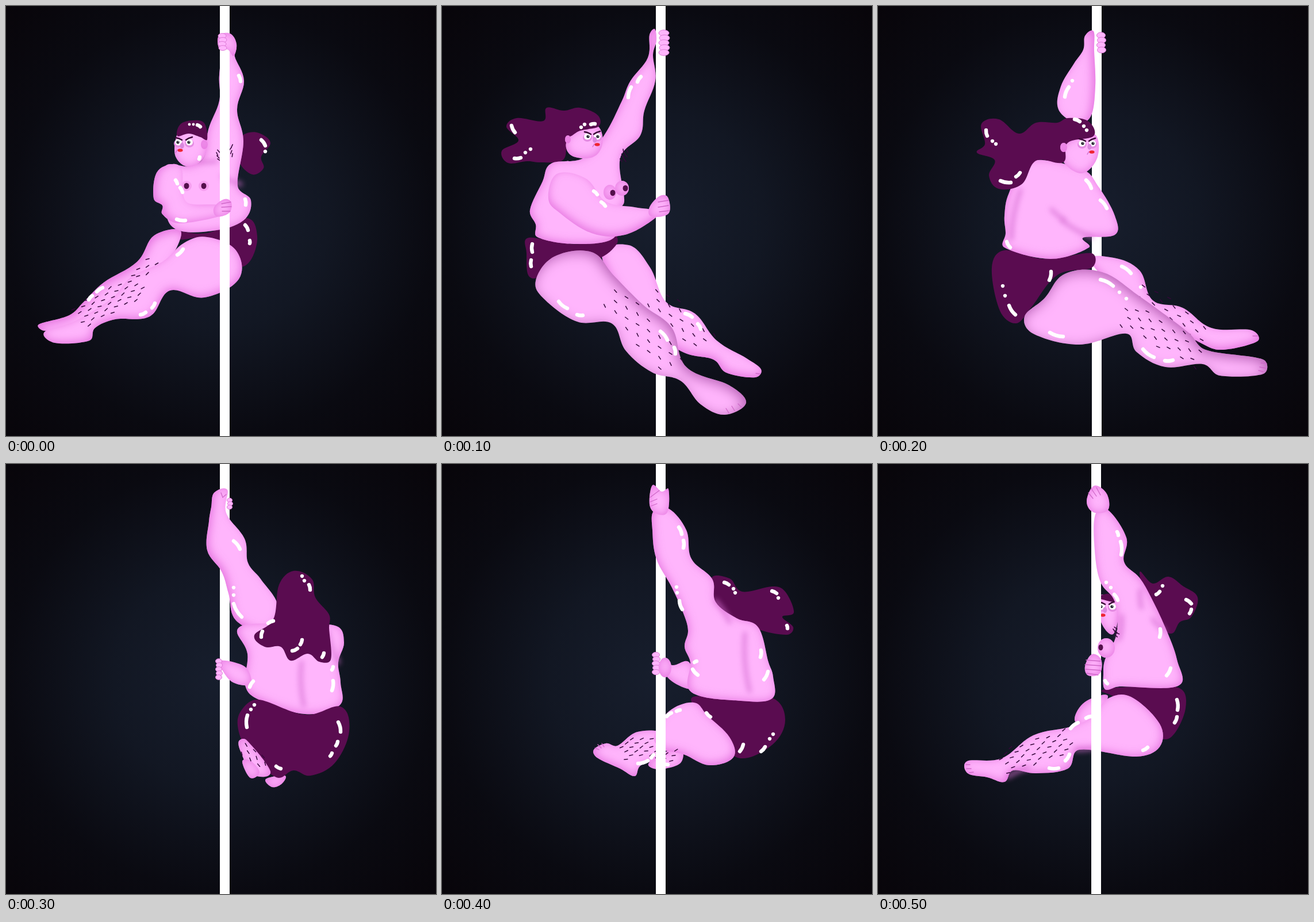
Animation, 748 px wide and 748 px high, one loop 600 ms. Source, as an HTML page:

```html
<!DOCTYPE html>
<html lang="en">
<head>
<meta charset="utf-8">
<title>Pole spin</title>
<style>
html, body { margin: 0; height: 100%; overflow: hidden; background: #08060b; }
svg { display: block; width: 100vw; height: 100vh; }
.pose { visibility: hidden; animation: turn .6s step-end infinite; animation-delay: calc(var(--i) * .1s - .6s); }
@keyframes turn { 0% { visibility: visible; } 16.666%, 100% { visibility: hidden; } }
.skin { fill: #ffb5fc; }
.dark { fill: #5a0c50; }
.pole { fill: #fff; }
.shine, .hair, .fold, .crease, .brow { fill: none; stroke-linecap: round; }
.shine { stroke: #fff; stroke-width: 6.4; }
.hair { stroke: #35083a; stroke-width: 1.5; }
.fold { stroke: #d670d2; stroke-width: 7; filter: url(#soft); opacity: .7; }
.crease { stroke: #cf68c8; stroke-width: 1.3; }
.brow { stroke: #3a0836; stroke-width: 2.6; }
</style>
</head>
<body>
<svg id="stage" viewBox="0 0 748 748">
  <defs>
    <radialGradient id="night" gradientUnits="userSpaceOnUse" cx="374" cy="374" r="530">
      <stop offset="0" stop-color="#171e2d"/>
      <stop offset=".35" stop-color="#121723"/>
      <stop offset=".7" stop-color="#0a0a11"/>
      <stop offset="1" stop-color="#08050a"/>
    </radialGradient>
    <filter id="soft" filterUnits="userSpaceOnUse" x="0" y="0" width="748" height="748"><feGaussianBlur stdDeviation="5"/></filter>
  </defs>
  <rect width="748" height="748" fill="url(#night)"/>
</svg>
<script>
const stage = document.getElementById('stage');
const defs = stage.querySelector('defs');
let pose, count = 0;

function add(tag, attrs, parent = pose) {
  const node = document.createElementNS('http://www.w3.org/2000/svg', tag);
  for (const k in attrs) node.setAttribute(k, attrs[k]);
  return parent.appendChild(node);
}

// Smooth closed outline through the points of "x y x y ..."
function outline(text) {
  const v = text.split(' ').map(Number), n = v.length / 2;
  const at = i => [v[(i + n) % n * 2], v[(i + n) % n * 2 + 1]];
  let d = 'M' + at(0);
  for (let i = 0; i < n; i++) {
    const [a, b, c, e] = [at(i - 1), at(i), at(i + 1), at(i + 2)];
    // limit handles on short spans, so tight corners do not loop
    const span = Math.hypot(c[0] - b[0], c[1] - b[1]);
    const pull = (u, w) => Math.min(1 / 5.4, .42 * span / Math.hypot(w[0] - u[0], w[1] - u[1]));
    const p = [0, 1].map(k => b[k] + (c[k] - a[k]) * pull(a, c));
    const q = [0, 1].map(k => c[k] - (e[k] - b[k]) * pull(b, e));
    d += `C${p} ${q} ${c}`;
  }
  return d + 'Z';
}

// Inner shadow falling in from the side opposite to (dx, dy)
function shade(dx, dy, deep) {
  const id = `in${dx}_${dy}_${deep ? 1 : 0}`.replace(/-/g, 'm');
  if (!document.getElementById(id)) {
    const f = add('filter', { id, 'color-interpolation-filters': 'sRGB' }, defs);
    add('feOffset', { in: 'SourceAlpha', dx, dy }, f);
    add('feGaussianBlur', { stdDeviation: deep ? 11 : 8, result: 'b' }, f);
    add('feComposite', { in: 'SourceAlpha', in2: 'b', operator: 'out', result: 'i' }, f);
    add('feFlood', { 'flood-color': deep ? '#a850a6' : '#df68d8', 'flood-opacity': .85 }, f);
    add('feComposite', { in2: 'i', operator: 'in', result: 's' }, f);
    const m = add('feMerge', {}, f);
    add('feMergeNode', { in: 'SourceGraphic' }, m);
    add('feMergeNode', { in: 's' }, m);
  }
  return `url(#${id})`;
}

const skin = (p, dx = 0, dy = 0, deep) =>
  add('path', { class: 'skin', d: outline(p), filter: shade(dx, dy, deep) });
const dark = p => add('path', { class: 'dark', d: outline(p) });
const dot = (cx, cy, rx, fill, ry = rx) => add('ellipse', { cx, cy, rx, ry, fill });
const ball = (x, y, rx, ry) => dot(x, y, rx, '#ffb5fc', ry).setAttribute('filter', shade(0, -2));
const pole = (x = 372) => add('rect', { class: 'pole', x, y: 0, width: 17, height: 748 });

// Strokes "x y x y|...", slightly bent; a lone point is a dot
const lines = (kind, bend = 0) => p => p.split('|').forEach(s => {
  const [x, y, u = x + .01, v = y] = s.split(' ').map(Number);
  const mx = (x + u) / 2 + (v - y) * bend, my = (y + v) / 2 - (u - x) * bend;
  add('path', { class: kind, d: `M${x} ${y}Q${mx} ${my} ${u} ${v}` });
});
const shine = lines('shine', .14), fold = lines('fold', -.08);
const crease = lines('crease'), brow = lines('brow', .1);

// Short hairs spread in rows around the line from (x, y) to (u, v)
function hairs(x, y, u, v, width, n, angle) {
  const len = Math.hypot(u - x, v - y), nx = (y - v) / len, ny = (u - x) / len;
  for (let i = 0; i < n; i++) {
    const t = (i + .5) / n, side = ((i * .618 + .3) % 1 - .5) * width;
    const a = (angle + 16 * Math.sin(i * 1.7)) * Math.PI / 180;
    const px = x + (u - x) * t + nx * side, py = y + (v - y) * t + ny * side;
    const hx = 3 * Math.cos(a), hy = 3 * Math.sin(a);
    add('path', { class: 'hair', d: `M${px - hx} ${py - hy}L${px + hx} ${py + hy}` });
  }
}

function fingers(x, y, n, step, rx = 8) {
  for (let i = 0; i < n; i++) {
    const f = dot(x + i % 2, y + i * step, rx, '#ffb5fc', step * .62);
    f.setAttribute('stroke', '#dc7ad6');
  }
}

function face(x1, x2, y, mx, my) {
  const mid = (x1 + x2) / 2, look = mx > mid ? 1 : -1;
  for (const x of [x1, x2]) {
    dot(x, y + 2, 8, '#e48be2', 7);
    dot(x, y, 6, '#fff', 5.5);
    dot(x + look, y, 2.6, '#20202c');
    dot(x + look + .6, y - .7, .8, '#fff');
  }
  dot((mid + mx) / 2, y + 6, 3.6, '#d987dd', 5);
  brow(`${x1 - 5} ${y - 8} ${x1 + 6} ${y - 4}|${x2 - 6} ${y - 4} ${x2 + 5} ${y - 9}`);
  dot(mx, my, 4.6, '#ee2430', 2.8);
  crease(`${mx - 8} ${my + 4} ${mx - 5} ${my - 1}`);
}

function nipple(x, y, rx = 4.5) {
  dot(x, y, rx, '#54104c', 5.2);
}

function scene(draw) {
  pose = add('g', { class: 'pose', style: `--i:${count++}` }, stage);
  draw();
}

scene(() => {
  dark('405 235 417 222 440 221 460 238 444 262 448 282 428 293 405 270');
  dark('298 392 350 395 418 369 437 400 425 443 400 452 350 406 303 406');
  skin('305 395 258 399 228 445 170 481 135 515 110 538 57 554 68 565 140 548 260 470', 3, 5);
  skin('310 412 350 402 400 425 405 475 345 507 285 495 250 540 190 545 155 560 145 582 85 586 67 567 120 548 185 508 218 471 272 445', -2, -3);
  hairs(262, 442, 225, 470, 26, 6, -30);
  hairs(235, 482, 125, 545, 44, 36, -28);
  skin('400 70 398 88 414 130 402 180 413 235 403 313 426 338 413 373 360 391 295 388 276 345 276 280 320 279 345 262 352 215 371 165 371 120 380 68');
  fold('333 270 366 270|376 296 408 310');
  skin('297 225 295 262 320 280 347 258 345 215 310 210');
  dark('298 226 303 206 325 199 345 204 350 232 338 228 318 222');
  ball(345, 241, 6, 8);
  face(300, 319, 237, 303, 251);
  for (const x of [314, 344]) { dot(x, 313, 9, '#f6a0f0'); nipple(x, 313); }
  skin('290 275 262 290 257 335 272 347 272 362 300 378 376 364 376 347 320 344 308 328 306 285', 5, -2);
  hairs(369, 250, 369, 270, 4, 4, 50);
  hairs(392, 241, 392, 262, 5, 4, 115);
  pole();
  skin('370 52 390 48 401 66 396 87 386 76 371 74');
  fingers(376, 52, 4, 7, 7);
  skin('362 350 380 336 392 342 388 360 366 366');
  crease('375 344 391 341|375 350 392 349|376 357 390 357');
  shine('405 121 408 131|444 233 451 243|451 253|333 207 338 210|295 303 298 309|303 316 307 324|312 373 297 371|416 336 417 346|416 381 421 390|424 408 424 413|308 423 298 433|158 497 168 490|144 511 150 504|259 517 254 525|243 533 234 537|337 263 336 266');
  for (const x of [319, 326]) dot(x, 206, 2.4, '#fff');
});

scene(() => {
  pole();
  skin('278 435 325 416 362 455 390 515 440 535 478 582 530 613 555 632 545 646 495 638 472 615 415 600 340 540', 2, -4);
  dark('148 404 190 408 240 414 298 398 304 414 270 440 200 445 168 472 150 468 147 430');
  skin('163 478 195 436 260 428 300 470 350 520 400 560 425 628 500 660 529 690 492 711 450 693 415 652 365 637 320 600 295 552 235 549 178 510', -4, 4, true);
  crease('521 698 515 692|509 704 504 696|499 708 494 700|553 640 546 639');
  hairs(365, 500, 462, 590, 46, 20, 48);
  hairs(292, 500, 405, 630, 50, 25, 48);
  dark('240 177 271 190 272 210 240 217 219 237 210 268 172 272 148 270 115 273 104 252 133 234 112 210 130 195 176 200 182 177 212 182');
  skin('367 85 371 130 352 182 345 225 310 265 317 340 302 360 298 404 230 414 166 402 163 380 153 355 175 305 190 274 245 265 282 225 313 165 328 130 358 90 361 50 370 40 373 60', 2, -2);
  skin('217 235 245 213 272 210 279 240 262 263 225 260', 0, -2);
  dark('224 226 240 206 273 203 270 211 240 217');
  ball(219, 232, 5, 7);
  face(253, 270, 227, 270, 241);
  ball(313, 317, 12, 13);
  ball(292, 324, 11, 13);
  nipple(297, 325);
  nipple(319, 317);
  skin('185 335 200 292 250 300 285 340 335 350 372 356 372 368 318 398 260 395 205 360', 0, -5);
  skin('361 350 378 331 393 333 394 361 364 366');
  crease('376 341 394 338|376 350 394 347|378 358 395 356');
  fingers(386, 47, 5, 8.5, 9);
  hairs(321, 250, 312, 270, 10, 8, 65);
  shine('127 220 121 208|137 264 126 265|145 255|154 249|242 211|248 206|259 206 266 205|340 132 346 123|324 159 329 141|264 322 270 328|277 341 284 348|157 428 157 414|155 453 155 442|218 526 203 514|245 538 235 537|423 535 435 541|445 553 450 562|380 566 392 581|404 594 406 605');
});

scene(() => {
  pole();
  skin('370 445 410 438 455 460 478 512 530 525 580 560 650 564 660 583 600 598 565 588 450 520', -2, -4);
  hairs(455, 490, 572, 575, 32, 18, 38);
  skin('376 78 378 140 370 192 345 203 314 180 318 140 341 100 357 76 360 52 375 44', -5, 2);
  fingers(388, 51, 4, 8.5, 7.5);
  dark('198 455 220 425 290 440 371 430 372 455 312 468 266 525 240 552 212 530');
  skin('255 540 290 508 325 466 390 463 455 505 540 568 570 598 670 615 670 640 595 643 565 623 500 628 450 602 432 570 350 589 270 570', -3, 5, true);
  crease('676 622 666 621|674 630 664 628|670 636 662 634|661 574 652 574');
  hairs(425, 535, 565, 610, 48, 28, 38);
  skin('262 270 355 284 384 315 412 365 412 398 357 403 367 420 300 440 220 420 222 395 220 365 228 325', 1, -2);
  fold('302 354 324 372|320 373 372 402|248 320 232 405');
  skin('325 240 375 222 382 262 355 291 322 270');
  dark('330 195 365 200 375 226 330 238 322 272 275 269 250 310 210 318 193 295 203 268 172 255 186 240 180 205 210 197 245 222 275 203 312 203');
  ball(323, 246, 6, 8);
  face(355, 373, 239, 372, 254);
  shine('190 226 188 216|199 235|205 240|231 307 213 304|247 290 240 297|342 197 351 201|358 209|363 216|362 303 371 317|387 338 398 352|325 158 332 141|338 130|230 420 224 410|217 487|221 504|239 537 228 521|301 462 298 477|387 476 409 487|420 498|432 509|424 453 440 465|457 489|322 575 299 568|480 611 461 597|513 616 499 617');
});

scene(() => {
  pole();
  skin('357 75 362 50 385 45 383 85 415 130 421 172 443 200 473 248 450 290 400 272 387 225 375 187 350 150 353 100', 4, -3);
  crease('374 50 377 58|383 53 377 58');
  fingers(389, 63, 3, 6, 4.5);
  skin('402 290 430 278 510 280 575 282 588 310 578 345 582 380 580 420 520 435 440 410 416 385 420 330', 1, -2);
  fold('514 345 518 420|560 292 578 345');
  skin('372 343 397 345 420 357 425 383 395 380 376 358');
  fingers(370, 343, 5, 7, 5.5);
  dark('475 210 500 186 532 200 538 232 562 262 562 285 565 340 545 344 525 330 495 342 478 318 450 318 432 298 465 270');
  skin('452 548 485 542 480 556 463 562');
  dark('412 425 440 410 520 436 582 422 597 465 572 520 530 542 500 533 470 545 420 497 403 455');
  skin('405 482 418 480 460 535 430 540 408 500');
  skin('411 518 425 516 441 536 425 546');
  hairs(412, 490, 448, 528, 26, 9, 60);
  shine('527 210 529 219|456 277 465 273|444 301 446 291|515 306 512 314|507 321 498 325|553 329 550 336|396 134 407 148|410 266 396 243|424 388 430 378|569 353 567 358|569 377 567 394|419 458 420 437|578 449 582 466|577 483 574 490|567 503 564 508|478 530 470 526|396 215|396 228|432 419|426 427|515 195|519 203');
});

scene(() => {
  skin('360 520 412 492 415 520 375 531', 0, 2);
  dark('437 405 510 406 575 407 597 445 575 488 520 512 480 480 445 430');
  skin('264 497 285 486 305 490 340 466 385 470 380 508 345 525 335 543 310 530 270 511', 2, -2);
  crease('266 494 273 497|271 488 277 494|278 486 282 492');
  skin('370 470 395 430 438 415 462 438 500 475 507 510 465 524 420 505 380 495', -2, -4);
  hairs(312, 500, 372, 488, 36, 18, -22);
  hairs(372, 515, 412, 508, 22, 7, -22);
  shine('358 516 341 521|364 511 368 506|378 524 393 523|391 439 399 433|408 430 414 428');
  pole();
  dark('468 200 500 199 522 222 575 213 597 222 612 258 592 266 611 284 600 297 545 286 485 255');
  skin('378 345 402 350 430 345 440 390 400 378', 0, -2);
  fingers(372, 332, 5, 7.5, 6.5);
  ball(388, 354, 11, 17);
  skin('368 82 395 78 425 115 434 165 470 200 476 240 512 268 550 284 568 345 576 370 574 408 520 412 434 397 432 345 422 318 428 290 420 260 400 215 373 165 366 115', 2, -1);
  fold('527 295 535 395|500 275 476 238');
  skin('361 70 366 37 382 48 394 44 392 84 372 86');
  crease('362 58 378 46|362 66 374 61|364 73 374 69');
  shine('412 110 417 122|420 133 420 146|408 214|409 224|418 253 413 238|491 206 499 210|507 217|510 224|574 221 582 225|585 233|600 281 601 286|555 324 554 336|567 361 560 375|439 345 443 343|445 367 436 357|467 440 460 433|524 488 518 500|562 492 555 500|570 478|576 470');
});

scene(() => {
  dark('455 190 478 208 505 196 530 212 556 232 545 266 525 275 510 295 480 275');
  skin('384 230 418 240 410 295 388 275');
  dark('382 231 402 226 414 240 384 234');
  face(389, 408, 248, 391, 263);
  skin('342 445 360 414 400 404 365 455', 2, 2);
  dark('389 394 430 388 522 389 535 425 510 475 480 470 410 405');
  skin('372 440 400 408 440 405 490 452 490 492 450 509 350 497 330 530 275 538 235 533 220 553 190 545 156 538 155 517 215 512 270 472 335 457', -2, -2);
  fold('262 528 226 544|345 497 380 492');
  crease('153 523 160 523|154 530 162 530|159 537 166 536');
  hairs(215, 522, 335, 478, 44, 34, -28);
  shine('335 460 348 450|362 442 371 439');
  pole(371);
  skin('378 88 400 80 432 128 428 170 455 198 475 232 500 285 520 340 522 386 420 387 395 392 392 365 395 340 415 295 412 240 387 205 377 150', -1, -1);
  fold('420 304 424 265|456 220 458 250|478 270 498 290');
  ball(397, 320, 15, 17);
  nipple(387.5, 319, 4);
  hairs(412, 284, 416, 300, 6, 5, 35);
  skin('363 65 376 38 398 52 400 80 375 84');
  crease('366 50 374 60|371 43 380 56|380 41 387 54');
  skin('360 352 372 331 388 340 386 364 366 368');
  crease('362 341 387 343|360 349 388 351|361 357 387 359|363 364 383 367');
  shine('416 118 418 124|422 135 423 158|397 206|405 215|411 227 417 237|495 212|490 222 484 227|536 236 545 243|545 253 542 260|491 287 490 301|509 355 502 368|399 382 395 377|520 410 521 428|520 440 516 450|469 493 461 498|314 529 298 529|333 505 326 516');
});
</script>
</body>
</html>
```
